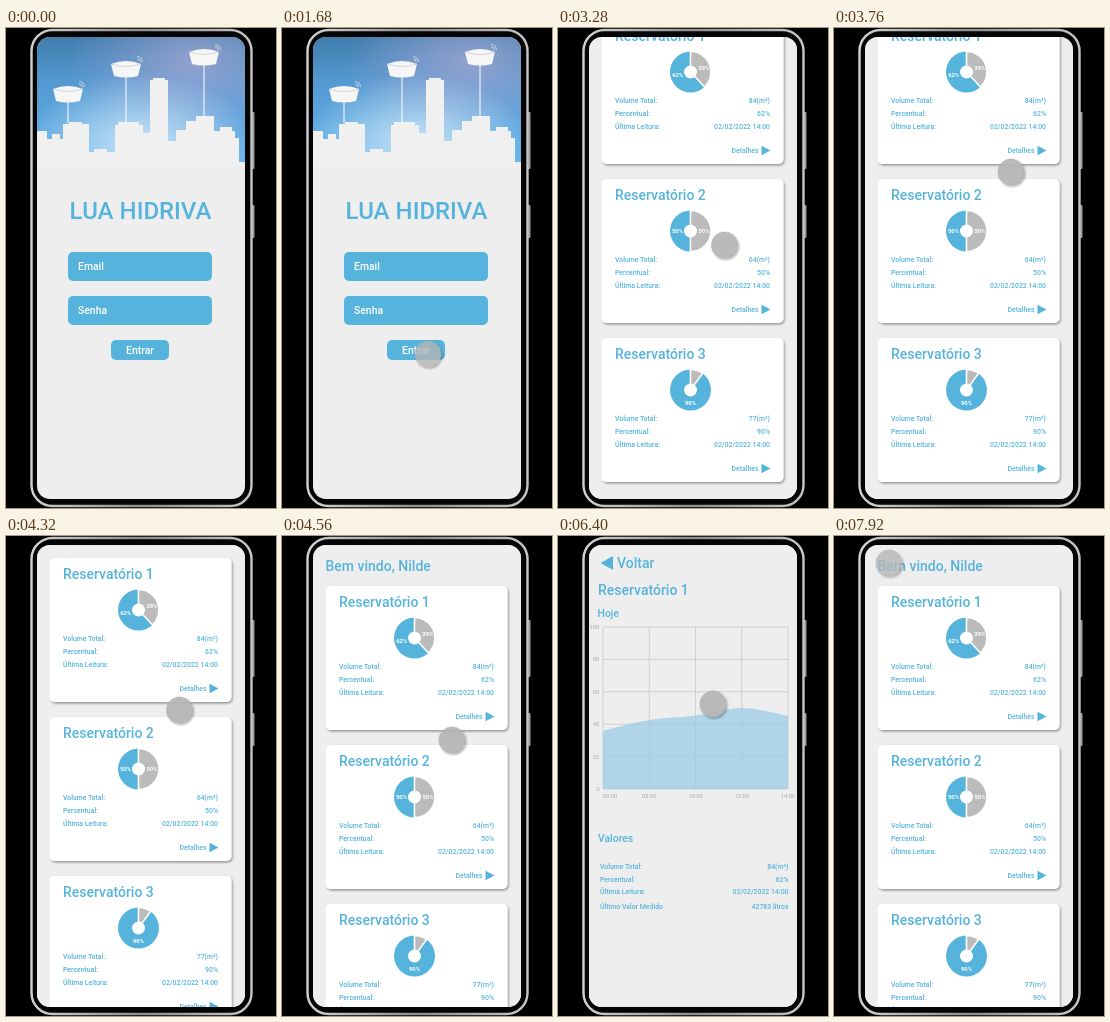
These frames come from a looping animation (270x480 px, 8000 ms). An HTML page:

```html
<!DOCTYPE html>
<html lang="pt">
<head>
<meta charset="utf-8">
<style>
html, body { margin: 0; width: 100%; height: 100%; overflow: hidden; background: #000; }
svg { display: block; width: 270px; height: 480px; font-family: Roboto, sans-serif; font-weight: 500; }
</style>
</head>
<body>
<svg id="stage" viewBox="0 0 270 480"></svg>
<script>
const BLUE = '#56b4dc', GREY = '#bbb', PAPER = '#eee', SCROLL = 58;

const text = (s, x, y, size, fill = BLUE, anchor = 'start', extra = '') =>
  `<text x="${x}" y="${y}" font-size="${size}" fill="${fill}" text-anchor="${anchor}" ${extra}>${s}</text>`;
const rect = (x, y, w, h, r, fill, extra = '') =>
  `<rect x="${x}" y="${y}" width="${w}" height="${h}" rx="${r}" fill="${fill}" ${extra}/>`;
const path = (d, fill, extra = '') => `<path d="${d}" fill="${fill}" ${extra}/>`;
const row = (label, value, left, right, y) =>
  text(label, left, y, 6.9) + text(value, right, y, 6.9, BLUE, 'end');

// Login screen
function device(x, y, stemEnd) {
  const arc = r => `M ${x + 11} ${y - 7 - r} a ${r} ${r} 0 0 1 ${r} ${r} `;
  return path(`M ${x} ${y + 7} V ${stemEnd}`, 'none', 'stroke="#fff"') +
    path(`M ${x - 15} ${y - 5} Q ${x} ${y - 11} ${x + 15} ${y - 5} L ${x + 12} ${y + 7} Q ${x} ${y + 10} ${x - 12} ${y + 7} Z`, '#f6f6f6') +
    path(`M ${x - 15} ${y - 5} Q ${x} ${y} ${x + 15} ${y - 5}`, 'none', 'stroke="#c3ccd5" stroke-width=".8"') +
    path(arc(3) + arc(5.5), 'none', 'stroke="#c3ccd8" stroke-width="1.2"');
}

// Each roof: left edge, right edge, top
const roofs = [
  [31, 41, 103], [41, 57, 111], [46, 54, 106], [57, 83, 96], [63, 76, 94],
  [83, 109, 124], [88, 101, 121], [109, 137, 97], [112, 133, 94], [137, 144, 105],
  [144, 162, 52], [147, 159, 50], [162, 170, 113], [170, 180, 102], [180, 190, 93],
  [190, 208, 88], [208, 229, 103], [214, 226, 99], [229, 233, 110]
];

function login() {
  const field = (label, y) => rect(62, y, 144, 29, 5, BLUE) + text(label, 72, y + 18.3, 10.4, '#fff');
  return rect(31, 8, 208, 464, 0, PAPER) +
    ['sky', 'lilac', 'glow'].map(id => rect(31, 8, 208, 126, 0, `url(#${id})`)).join('') +
    roofs.map(([a, b, top]) => rect(a, top, b - a, 135 - top, 0, '#f0f0f0', 'shape-rendering="crispEdges"')).join('') +
    device(62, 66, 95) + device(120, 41, 95) + device(198, 29, 90) +
    text('LUA HIDRIVA', 134.5, 191, 24, BLUE, 'middle') +
    field('Email', 224) + field('Senha', 268) +
    rect(105, 312, 58, 20, 5, BLUE) + text('Entrar', 134, 325.7, 10.4, '#fff', 'middle');
}

// Reservoir list
function pie(full, labels) {
  const cx = 132.5, cy = 52, r = 20.5, a = (1 - full) * 2 * Math.PI;
  const ex = cx + r * Math.sin(a), ey = cy - r * Math.cos(a);
  const slice = path(`M ${cx} ${cy} V ${cy - r} A ${r} ${r} 0 0 1 ${ex} ${ey} Z`, GREY, 'stroke="#fff" stroke-width="1.6"');
  return `<circle cx="${cx}" cy="${cy}" r="${r}" fill="${BLUE}"/>` + slice +
    `<circle cx="${cx}" cy="${cy}" r="6.5" fill="#fff"/>` +
    labels.map(([s, dx, dy]) => text(s, cx + dx, cy + dy + 2, 5.8, '#fff', 'middle', 'font-weight="700"')).join('');
}

function card(i, volume, full, labels) {
  return `<g transform="translate(0 ${50 + 159 * i})">` +
    rect(43.5, 0, 182, 144, 5, '#fff', 'filter="url(#shadow)"') +
    text(`Reservatório ${i + 1}`, 57, 21, 14) + pie(full, labels) +
    row('Volume Total:', `${volume}(m³)`, 57, 212, 83) +
    row('Percentual:', `${full * 100}%`, 57, 212, 95.7) +
    row('Última Leitura:', '02/02/2022 14:00', 57, 212, 108.5) +
    text('Detalhes', 173.5, 132.7, 6.9) + path('M 203.5 125.7 L 212.5 130.5 L 203.5 135.3 Z', BLUE) + '</g>';
}

const list = () => rect(31, 8, 208, 464, 0, PAPER) + '<g id="scroll">' +
  text('Bem vindo, Nilde', 43.5, 35, 14) +
  card(0, 84, .62, [['62%', -12.8, 2.5], ['38%', 13.3, -4]]) +
  card(1, 64, .5, [['50%', -13, 0], ['50%', 13.5, 0]]) +
  card(2, 77, .9, [['90%', 0, 13]]) + '</g>';

// Details
function details() {
  const step = 46.25, levels = [195, 184, 179.5, 172, 180], slopes = [-14, -8, -6, 0, 10];
  const grid = levels.map((_, i) => `M ${45 + step * i} 91 V 253 `).join('') +
    [0, 1, 2, 3, 4, 5].map(i => `M 45 ${91 + 32.4 * i} H 230 `).join('');
  let curve = 'M 45 253 V 195';
  for (let i = 1; i < levels.length; i++) {
    const x = 45 + step * i;
    curve += ` C ${x - step * 2 / 3} ${levels[i - 1] + slopes[i - 1] / 3} ${x - step / 3} ${levels[i] - slopes[i] / 3} ${x} ${levels[i]}`;
  }
  const hours = ['00:00', '05:00', '10:00', '12:00', '14:00'];
  return rect(31, 8, 208, 464, 0, PAPER) +
    path('M 42.5 27 L 55 20 V 34 Z', BLUE) + text('Voltar', 59, 32, 14) +
    text('Reservatório 1', 40, 59, 14) + text('Hoje', 39.5, 81, 10.4) +
    path(grid, 'none', 'stroke="#ccc" stroke-width=".9"') +
    path(curve + ' V 253 Z', '#9dcce6', 'opacity=".75"') +
    [100, 80, 60, 40, 20, 0].map((n, i) => text(n, 41.5, 93 + 32.4 * i, 6, '#aaa', 'end', 'font-weight="400"')).join('') +
    hours.map((h, i) => text(h, i ? 45 + step * i : 52, 262, 5.8, '#aaa', 'middle', 'font-weight="400"')).join('') +
    text('Valores', 40, 305.5, 10.4) +
    row('Volume Total:', '84(m³)', 42, 230.5, 333) +
    row('Percentual:', '62%', 42, 230.5, 345.5) +
    row('Última Leitura:', '02/02/2022 14:00', 42, 230.5, 358) +
    row('Último Valor Medido', '42783 litros', 42, 230.5, 373);
}

const stage = document.getElementById('stage');
stage.innerHTML = `<defs>
  <linearGradient id="sky" x2="0" y2="1"><stop stop-color="#3f7cab"/><stop offset=".35" stop-color="#5498d0"/><stop offset="1" stop-color="#62b2ec"/></linearGradient>
  <radialGradient id="lilac" cx=".75" cy=".2" r=".6"><stop stop-color="#a3a6d2" stop-opacity=".8"/><stop offset="1" stop-color="#a3a6d2" stop-opacity="0"/></radialGradient>
  <radialGradient id="glow" cx=".5" cy=".85" r=".55"><stop stop-color="#dceefa" stop-opacity=".85"/><stop offset="1" stop-color="#dceefa" stop-opacity="0"/></radialGradient>
  <linearGradient id="metal"><stop stop-color="#d2d2d2"/><stop offset=".5" stop-color="#8d8d8d"/><stop offset="1" stop-color="#c6c6c6"/></linearGradient>
  <filter id="shadow"><feDropShadow dx="1.2" dy="1.5" stdDeviation="1" flood-opacity=".38"/></filter>
  <clipPath id="screen">${rect(31, 9, 208, 462, 13, '#000')}</clipPath>
</defs>
${rect(0, 0, 270, 480, 0, '#000')}
${rect(245, 84, 3.5, 57, 1, '#999')}${rect(245, 177, 3.5, 33, 1, '#999')}
${rect(25.5, 2, 220, 476, 21, '#050505', 'stroke="url(#metal)" stroke-width="2.4"')}
<g clip-path="url(#screen)">
  <g id="login">${login()}</g><g id="list">${list()}</g><g id="details">${details()}</g>
  <g id="touch"><circle r="13" fill="#b5b5b5" stroke="#a2a2a2" stroke-width=".8" stroke-dasharray="1.5 1" filter="url(#shadow)"/></g>
</g>`;

const clamp = (v, lo = 0, hi = 1) => Math.min(hi, Math.max(lo, v));
const ramp = (t, start, length) => clamp((t - start) / length);

// Touch path: time, x, y
const moves = [
  [1200, 172, 371], [1600, 146, 326], [2080, 146, 326], [2640, 156, 290], [2800, 156, 290],
  [3760, 177, 144], [4080, 177, 144], [4560, 170, 204], [4880, 167, 224], [5440, 196, 180],
  [5840, 196, 180], [6320, 155, 168], [6560, 155, 168], [7440, 55, 27], [8000, 55, 27]
];

function touchAt(t) {
  const i = clamp(moves.findIndex(m => m[0] > t), 1, moves.length - 1);
  const [t0, x0, y0] = moves[i - 1], [t1, x1, y1] = moves[i];
  const p = ramp(t, t0, t1 - t0), e = p * p * (3 - 2 * p);
  return [x0 + (x1 - x0) * e, y0 + (y1 - y0) * e];
}

function scrollAt(t, y) {
  if (t < 2800 || t >= 4880) return 0;
  return clamp(y - (t < 4080 ? 290 : 202), -SCROLL, 0);
}

const [listEl, scrollEl, detailsEl, touchEl] =
  ['list', 'scroll', 'details', 'touch'].map(id => document.getElementById(id));

function draw() {
  const t = Math.floor(performance.now() % 8000 / 80) * 80;
  const [x, y] = touchAt(t);
  const pressed = (t >= 1600 && t < 2080) || t >= 7440;
  listEl.setAttribute('opacity', ramp(t, 2000, 240));
  detailsEl.setAttribute('opacity', ramp(t, 5680, 240) - ramp(t, 7600, 240));
  scrollEl.setAttribute('transform', `translate(0 ${scrollAt(t, y)})`);
  touchEl.setAttribute('transform', `translate(${x} ${y})`);
  touchEl.setAttribute('opacity', ramp(t, 1120, 240) * (pressed ? .78 : .92));
  requestAnimationFrame(draw);
}
draw();
</script>
</body>
</html>
```
